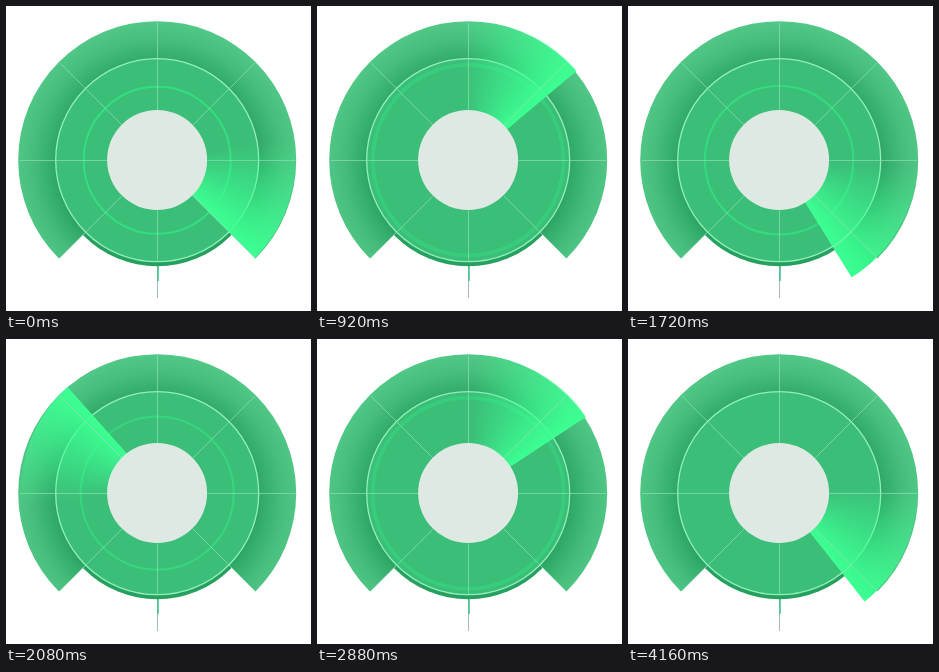
An HTML page with a canvas for the animation above (4200 ms loop, 305 px wide and 305 px high).

```html
<!DOCTYPE html>
<html lang="en">
<head>
<meta charset="utf-8">
<title>Radar</title>
<style>
  html, body { margin: 0; width: 100%; height: 100%; overflow: hidden; background: #fff; }
  canvas { display: block; width: 305px; height: 305px; }
</style>
</head>
<body>
<canvas id="stage" width="305" height="305"></canvas>
<script>
const ctx = document.getElementById('stage').getContext('2d');
const CX = 151.2, CY = 154.2, OUTER = 139, DISC = 101.5, HUB = 50;
const LOOP = 4200, STEP = 40;
const TURN_PER_STEP = 58.91, PULSE_PER_STEP = 0.8164, TAIL = 55;
const BRIGHT = '60,255,146';
const rad = deg => deg * Math.PI / 180;
const polar = (r, deg, x = CX, y = CY) => [x + r * Math.cos(rad(deg)), y + r * Math.sin(rad(deg))];

// phase, radius, opacity of the expanding ring
const PULSE = [
  [0, 73.5, 0.85], [0.453, 76.5, 0.6], [0.613, 85.5, 0.45], [0.781, 95.5, 0.4],
  [0.843, 108.5, 0.2], [0.9, 112, 0], [0.91, 73, 0], [0.941, 73.2, 0.25], [1, 73.5, 0.85]
];

function pulseAt(phase) {
  const i = PULSE.findIndex((p, n) => n && phase <= p[0]);
  const [a, b] = [PULSE[i - 1], PULSE[i]];
  const f = (phase - a[0]) / (b[0] - a[0]);
  return { r: a[1] + (b[1] - a[1]) * f, alpha: a[2] + (b[2] - a[2]) * f };
}

function disc(x, y, r, fill) {
  ctx.beginPath();
  ctx.arc(x, y, r, 0, 2 * Math.PI);
  ctx.fillStyle = fill;
  ctx.fill();
}

function ring(r, width, color) {
  ctx.beginPath();
  ctx.arc(CX, CY, r, 0, 2 * Math.PI);
  ctx.lineWidth = width;
  ctx.strokeStyle = color;
  ctx.stroke();
}

function line(a, b, color, width = 1) {
  ctx.beginPath();
  ctx.moveTo(...a);
  ctx.lineTo(...b);
  ctx.lineWidth = width;
  ctx.strokeStyle = color;
  ctx.stroke();
}

function sectorPath(r, from, to) {
  ctx.moveTo(CX, CY);
  ctx.arc(CX, CY, r, rad(from), rad(to));
  ctx.closePath();
}

function clipped(path, draw) {
  ctx.save();
  ctx.beginPath();
  path();
  ctx.clip();
  draw();
  ctx.restore();
}

function sweepPivot(angle) {
  return polar(2, angle + 90, 152.2, 152.7);
}

function conic(angle, from, to) {
  const g = ctx.createConicGradient(rad(angle - TAIL), ...sweepPivot(angle));
  g.addColorStop(0, from);
  g.addColorStop(TAIL / 360, to);
  g.addColorStop(TAIL / 360 + 0.001, `rgba(${BRIGHT},0)`);
  return g;
}

// Opaque part of the beam in the open bottom, with a notched tail
function gapSweep(angle) {
  const [x, y] = sweepPivot(angle);
  ctx.beginPath();
  ctx.moveTo(x, y);
  for (let lag = 0; lag <= 46; lag++) {
    const r = lag <= 28 ? 138.5 : 125 - (lag - 28);
    ctx.lineTo(...polar(r, angle - lag, x, y));
  }
  ctx.closePath();
  ctx.fillStyle = conic(angle, 'rgb(36,190,105)', `rgb(${BRIGHT})`);
  ctx.fill();
}

function beam(angle) {
  const [x, y] = sweepPivot(angle);
  ctx.beginPath();
  ctx.moveTo(x, y);
  ctx.arc(x, y, 138.5, rad(angle - TAIL), rad(angle));
  ctx.closePath();
  ctx.fillStyle = conic(angle, `rgba(${BRIGHT},0)`, `rgba(${BRIGHT},1)`);
  ctx.fill();
}

function shadow() {
  const g = ctx.createRadialGradient(CX, CY + 4, 96, CX, CY + 4, 143);
  g.addColorStop(0, 'rgba(28,150,84,.8)');
  g.addColorStop(0.2, 'rgba(28,150,84,.58)');
  g.addColorStop(0.6, 'rgba(28,150,84,.22)');
  g.addColorStop(1, 'rgba(28,150,84,0)');
  return g;
}

function draw(step) {
  const angle = (45 + TURN_PER_STEP * step) % 360;
  const pulse = pulseAt((PULSE_PER_STEP * step) % 1);
  const pulseWidth = 2 + Math.max(0, pulse.r - 73) * 0.08;
  const pulseOutside = pulse.r > 103 && pulse.alpha > 0.1;

  ctx.fillStyle = '#fff';
  ctx.fillRect(0, 0, 305, 305);

  // Open bottom
  line([151.5, 255], [151.5, 292], '#9dbfae');
  line([152, 255], [152, 275], '#45c486', 1.6);
  clipped(() => sectorPath(150, 45, 135), () => {
    if (pulseOutside) ring(pulse.r, 3, '#2aa866');
    disc(CX, CY + 2, 104, '#26a05e');
    gapSweep(angle);
  });

  // Fan and inner disc
  ctx.beginPath();
  sectorPath(OUTER, 135, 405);
  ctx.fillStyle = '#52c887';
  ctx.fill();
  ctx.fillStyle = shadow();
  ctx.fill();
  disc(CX, CY, DISC, '#3bbe78');

  if (pulse.r > 103) {
    clipped(() => sectorPath(OUTER, 135, 405),
      () => ring(pulse.r, pulseWidth, `rgba(35,160,92,${pulse.alpha})`));
  } else {
    ring(pulse.r, pulseWidth, `rgba(50,228,131,${pulse.alpha})`);
  }
  ring(DISC, 1.3, '#92efbb');

  clipped(() => {
    sectorPath(OUTER + 2, 135, 405);
    ctx.moveTo(CX + DISC, CY);
    ctx.arc(CX, CY, DISC, 0, 2 * Math.PI);
  }, () => beam(angle));

  for (let deg = 0; deg < 360; deg += 45) {
    const end = deg === 90 ? DISC : OUTER - 1;
    line(polar(HUB, deg, 151.5, 154.5), polar(end, deg, 151.5, 154.5), 'rgba(150,225,182,.65)');
  }
  disc(151.1, 154, HUB, '#dfe9e4');
}

function frame(now) {
  // The small lead keeps a hold from being entered one refresh late
  draw(Math.floor(((now + 10) % LOOP) / STEP));
  requestAnimationFrame(() => frame(performance.now()));
}
frame(performance.now());
</script>
</body>
</html>
```
